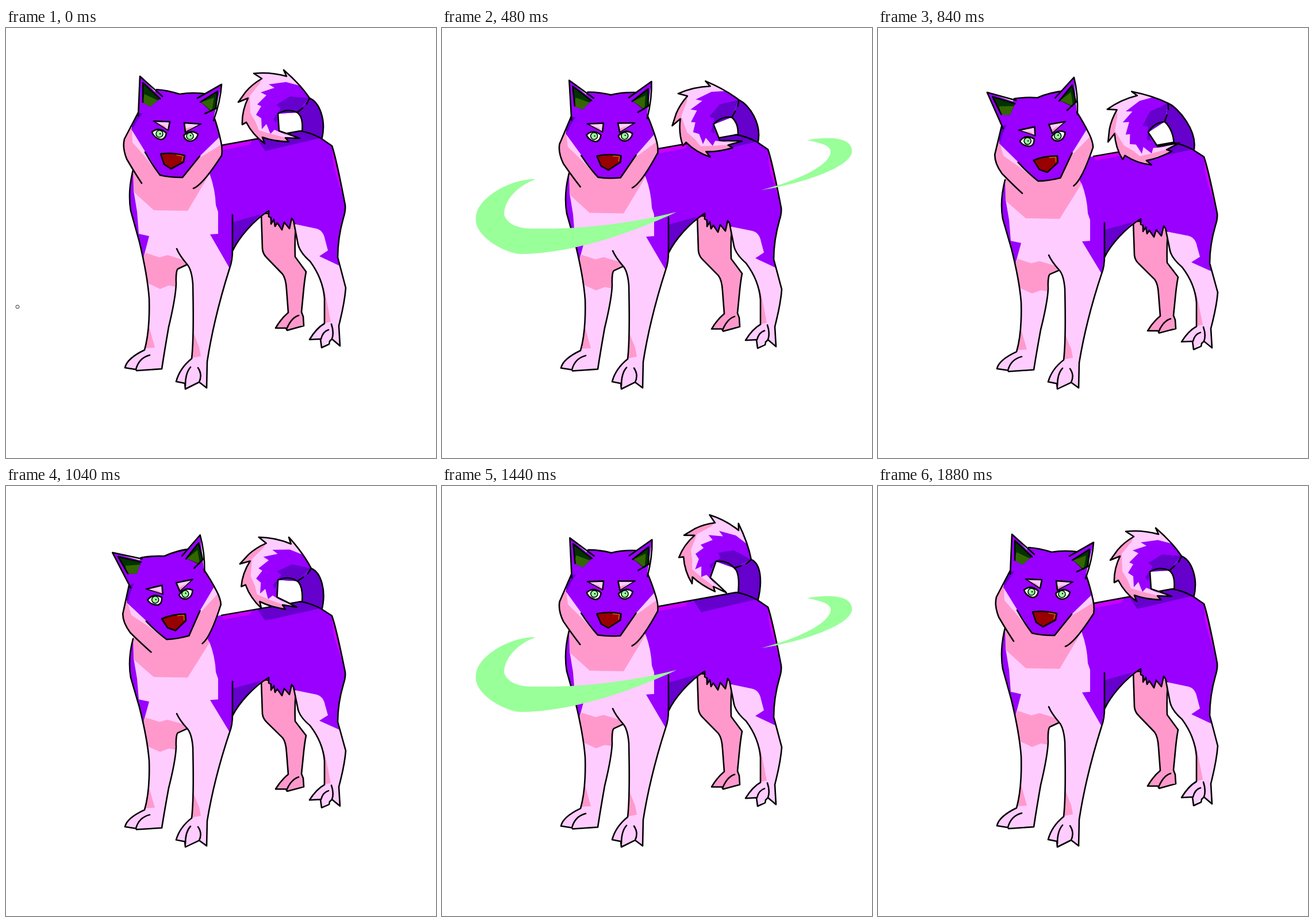
Animation of 748 by 748 pixels, one loop 1.92 s. Source, as an HTML page:

```html
<!DOCTYPE html>
<html>
<head>
<meta charset="utf-8">
<title>Purple dog</title>
<style>
html, body { margin: 0; height: 100%; overflow: hidden; background: #fff; }
svg { display: block; width: 100vw; height: 100vh; }
path { fill: none; stroke-linejoin: round; stroke-linecap: round; }
.line { stroke: #000; stroke-width: 2.6; }
.thin { stroke: #000; stroke-width: 1.6; }
.main { fill: #90f; }
.dark { fill: #60c; }
.glow { fill: #c0f; }
.pale { fill: #fcf; }
.pink { fill: #f9c; }
.moss { fill: #360; }
.deep { fill: #030; }
.mint { fill: #9f9; }
.white { fill: #fff; }
.nose { fill: #900; }
</style>
</head>
<body>
<svg viewBox="0 0 748 748">
  <circle id="dot" cx="20" cy="485" r="3" fill="none" stroke="#333"/>
  <path id="base" class="dark line"/>

  <g id="body">
    <!-- far hind leg -->
    <path class="pink line" d="M444 322L446 384Q447 393 453 399L481 428Q487 436 488 455L491 495Q478 506 469 522L487 522L489 526L518 518L517 502L514 494L517 463Q519 440 522 424L503 398Q502 370 504 345L500 325Z"/>
    <path class="line" d="M488 524Q496 504 509 500"/>

    <!-- torso -->
    <path class="main" d="M228 225L221 247C214 275 214 300 217 318L239 400L300 400L389 418L394 388C405 365 430 335 457 318L461 341L466 333L468 345L472 339L480 351L484 338L493 349L497 331L500 335L545 402L581 414L577 397C577 380 580 355 587 330Q591 318 590 308C578 245 572 220 567 205L548 192Q530 182 512 179L375 204Z"/>
    <path class="dark" d="M437 193L451 214L548 191Q530 182 512 179ZM394 338L443 324Q415 350 394 388Z"/>
    <path class="glow" d="M376 205L428 195L424 203L378 212ZM567 206L587 295Q574 258 569 235Z"/>

    <!-- near hind leg -->
    <path class="pale" d="M502 341L540 349Q552 352 555 368L560 387L545 397L581 414L591 452C589 480 582 505 579 518L581 553L567 541L549 556L547 541L528 542Q540 522 554 514L554 470C552 446 543 425 529 406Q511 390 508 376Z"/>
    <path class="pink" d="M553 450L561 490L565 511L555 513Z"/>
    <path class="line" d="M375 204L430 194L512 179Q530 182 548 192L567 205C572 220 578 245 590 308Q591 318 587 330C580 355 577 380 577 399L581 414L591 452C589 480 582 505 579 518L581 553L567 541L563 545L562 550L549 556L547 541L528 542Q540 522 554 514L554 470C552 446 543 425 529 406Q511 390 508 376L500 335L497 331L493 349L484 338L480 351L472 339L468 345L466 333L461 341L461 330L457 328L457 318C430 335 405 365 394 388V325M548 541Q551 528 561 525M567 541Q571 530 566 515"/>

    <!-- chest and front legs -->
    <path class="pale" d="M222 283L228 320L231 358L249 362L239 400Q246 435 249 470C250 505 248 535 241 560Q210 575 207 591L226 595L271 593Q276 560 283 520Q295 470 296 445Q295 422 299 419L314 412Q323 420 325 445C326 490 327 540 323 575Q302 595 296 615L311 618L312 628L336 616L349 626L350 580Q362 503 389 418L355 359L369 358L369 320L365 308Q364 280 354 253Z"/>
    <path class="pink" d="M228 220L221 247L222 285L257 317L316 318L354 254L340 225Z"/>
    <path class="pink" d="M238 402L243 391L267 399L281 395L307 403L314 412L299 419L296 450L283 448L268 454L247 444ZM249 520L259 556L242 557ZM326 530L336 555L339 571L323 574Z"/>
    <path class="line" d="M221 247C214 275 214 300 217 318L232 372Q246 430 249 470C250 505 248 535 241 560Q210 575 207 591L226 594L227 596L271 593Q276 560 283 520Q295 470 296 445Q295 422 299 419L314 412M226 594Q231 574 250 569M297 384Q302 396 315 411Q323 420 325 445C326 490 327 540 323 575Q302 592 296 615L311 618L312 628L336 616L349 626L350 580Q362 503 389 418Q394 405 394 385M312 622Q312 600 321 590M336 616Q342 603 334 591"/>
  </g>

  <g id="tail">
    <path class="pale" d="M528 122Q512 98 483 73L488 84Q460 76 431 79L445 88Q428 98 417 111L404 129L421 122Q410 145 411 168L418 164Q429 186 450 201L446 190Q465 197 492 198L486 191L511 192Q490 184 475 179L473 149Q490 139 507 147Z"/>
    <path class="pink" d="M431 79L445 88L441 97L424 118L425 148L434 163L440 178L460 184L488 191L492 198L446 190L450 201Q429 186 418 164L411 168Q410 145 421 122L404 129L417 111Q428 98 445 88Z"/>
    <path class="main" d="M528 122L510 100L487 94L457 98L467 104L443 112L453 117L437 133L444 136L435 151L444 157L445 176L453 167L460 184L467 177L490 187L475 179L473 149L507 147Z"/>
    <path class="dark" d="M528 122L494 119L470 134L478 140L465 159L470 165L473 149L507 147Z"/>
    <path class="line" d="M528 122Q512 98 483 73L488 84Q460 76 431 79L445 88Q428 98 417 111L404 129L421 122Q410 145 411 168L418 164Q429 186 450 201L446 190Q465 197 492 198L486 191L511 192Q490 184 475 179L473 149Q490 139 507 147L516 139M528 122L523 132"/>
  </g>

  <g id="head">
    <path class="pink" d="M230 147L206 193Q202 208 210 228L236 270L300 285L326 279Q342 273 376 222L374 198L362 155Z"/>
    <path class="pale" d="M219 173L220 199L242 224L268 257L307 260L335 227L374 203L370 188L300 200Z"/>
    <path class="main" d="M230 147L218 176L242 215L268 256L307 260L338 222L371 190L362 155L352 115Q325 111 302 115Q280 108 262 107Z"/>
    <path class="dark" d="M231 143L246 138L229 160L219 177L219 170Z"/>
    <path class="line" d="M230 147L206 193Q202 208 210 228Q224 252 236 270M362 155Q369 175 374 198Q377 212 375 222Q342 273 326 279M242 216Q254 238 268 256Q285 260 307 260L337 223M262 107Q280 108 302 115Q325 111 352 115"/>

    <g id="earL">
      <path class="main" d="M230 148L233 84L272 124L252 150Z"/>
      <path class="deep" d="M238 95L268 123L251 137L237 129Z"/>
      <path class="moss" d="M241 115L264 126L251 137L237 129Z"/>
      <path class="line" d="M230 153L233 84L272 119M238 129L238 95L268 123"/>
    </g>
    <g id="earR">
      <path class="main" d="M333 122L375 98L361 157L345 148Z"/>
      <path class="deep" d="M338 128L368 110L365 140L357 146Z"/>
      <path class="moss" d="M340 129L362 121L358 145Z"/>
      <path class="line" d="M333 122L375 98Q373 128 361 161M338 129L368 110L365 140L346 149"/>
    </g>

    <path class="pale" d="M257 162L285 163L282 178ZM310 165L339 167L312 181Z"/>
    <path class="pink" d="M262 165L276 170L282 178ZM312 175L326 171L312 181Z"/>
    <path class="line" d="M257 162L285 163L282 178M312 181L310 165L339 167"/>
    <path class="thin" d="M257 162L282 178M339 167L312 181"/>
    <path class="white line" d="M254 181Q266 171 279 183Q277 194 269 194Q257 191 254 181ZM309 187Q322 175 334 185Q331 196 320 197Q311 196 309 187Z"/>
    <g class="mint thin">
      <circle cx="267" cy="184" r="6"/>
      <circle cx="320" cy="188" r="6"/>
    </g>
    <circle cx="268" cy="184" r="1.2"/>
    <circle cx="321" cy="187" r="1.2"/>
    <path class="nose line" d="M269 219Q290 216 311 222L309 233L287 245L275 237Z"/>
    <path stroke="#c60" stroke-width="1.5" d="M297 221L308 223L306 231"/>
  </g>

  <path id="swirlL" class="mint"/>
  <path id="swirlR" class="mint"/>
</svg>
<script>
const $ = id => document.getElementById(id);
const set = (id, name, value) => $(id).setAttribute(name, value);

// thin, full and fading shapes of each swirl
const left = [
  'M345 313C310 318 270 320 200 304C170 297 164 291 164 284C165 278 169 275 173 275C169 277 167 281 167 286C169 293 174 296 184 298C250 314 300 318 345 313Z',
  'M408 320C330 357 220 394 135 393C105 390 55 360 59 330C60 295 120 262 163 263C130 275 108 300 108 325C115 345 140 350 165 349C260 350 340 337 408 320Z',
  'M440 335C350 400 250 445 120 437C50 425 6 385 8 345C12 300 80 255 150 247C85 262 14 305 12 345C14 385 55 422 120 433C250 440 350 395 440 335Z'
];
const right = [
  'M560 271C595 260 632 240 636 215C636 211 630 211 615 211C630 213 634 213 633 217C628 238 592 256 560 271Z',
  'M555 282C620 272 706 245 713 217C716 190 675 188 635 195C660 200 678 205 676 217C672 240 620 265 555 282Z',
  'M600 292C670 270 743 235 745 205C743 175 700 165 640 170C700 168 740 178 742 205C740 232 668 267 600 292Z'
];

function mix(a, b, u) {
  const to = b.match(/\d+/g);
  let n = 0;
  return a.replace(/\d+/g, v => (+v + (to[n++] - v) * u).toFixed(1) + ' ');
}

function swirl(id, shapes, step) {
  let d = '';
  if (step >= 8 && step <= 12) d = mix(shapes[0], shapes[1], (step - 8) / 4);
  else if (step > 12 && step < 16) d = mix(shapes[1], shapes[2], 1 - ((15 - step) / 3) ** 2);
  set(id, 'd', d);
}

function tailAngle(i) {
  if (i < 19) return -45 * (i / 19) ** 2;
  if (i < 32) return 43 - 88 * ((32 - i) / 13) ** 1.15;
  return 43 * ((47 - i) / 15) ** 2;
}

function draw(i) {
  // crouch: speeds up going down, slows coming back up
  const p = (i < 24 ? i / 24 : (47 - i) / 23) ** 2;
  const squash = 1 - .059 * p;
  set('body', 'transform', `matrix(1 0 0 ${squash} 0 ${628 * (1 - squash)})`);
  set('head', 'transform', `translate(0 ${8 * p}) rotate(${-18.3 * p} 290 215)`);
  set('earL', 'transform', `rotate(${-21 * p * p} 230 148)`);
  set('earR', 'transform', `rotate(${-5 * p} 345 140)`);

  const angle = tailAngle(i), curl = Math.min(34, Math.max(0, -angle)) ** 2;
  const drop = 26 * p, dx = -.014 * curl, dy = drop - .019 * curl;
  set('tail', 'transform', `translate(${dx} ${dy}) rotate(${angle} 533 146)`);

  const r = angle * Math.PI / 180, c = Math.cos(r), s = Math.sin(r);
  const joint = (x, y) => [533 + x * c - y * s + dx, 146 + x * s + y * c + dy];
  const [ox, oy] = joint(-5, -24), [ix, iy] = joint(-26, 1);
  set('base', 'd', `M${ox} ${oy}C${ox + 17} ${oy + 7} 558 ${160 + drop} 549 ${195 + drop}
    L514 ${190 + drop}C517 ${168 + drop} ${ix + 9} ${iy + 8} ${ix} ${iy}`);

  swirl('swirlL', left, i % 24);
  swirl('swirlR', right, i % 24);
  set('dot', 'visibility', i ? 'hidden' : 'visible');
}

const start = performance.now();
function tick() {
  draw(Math.floor((performance.now() - start) / 40) % 48);
  requestAnimationFrame(tick);
}
tick();
</script>
</body>
</html>
```
